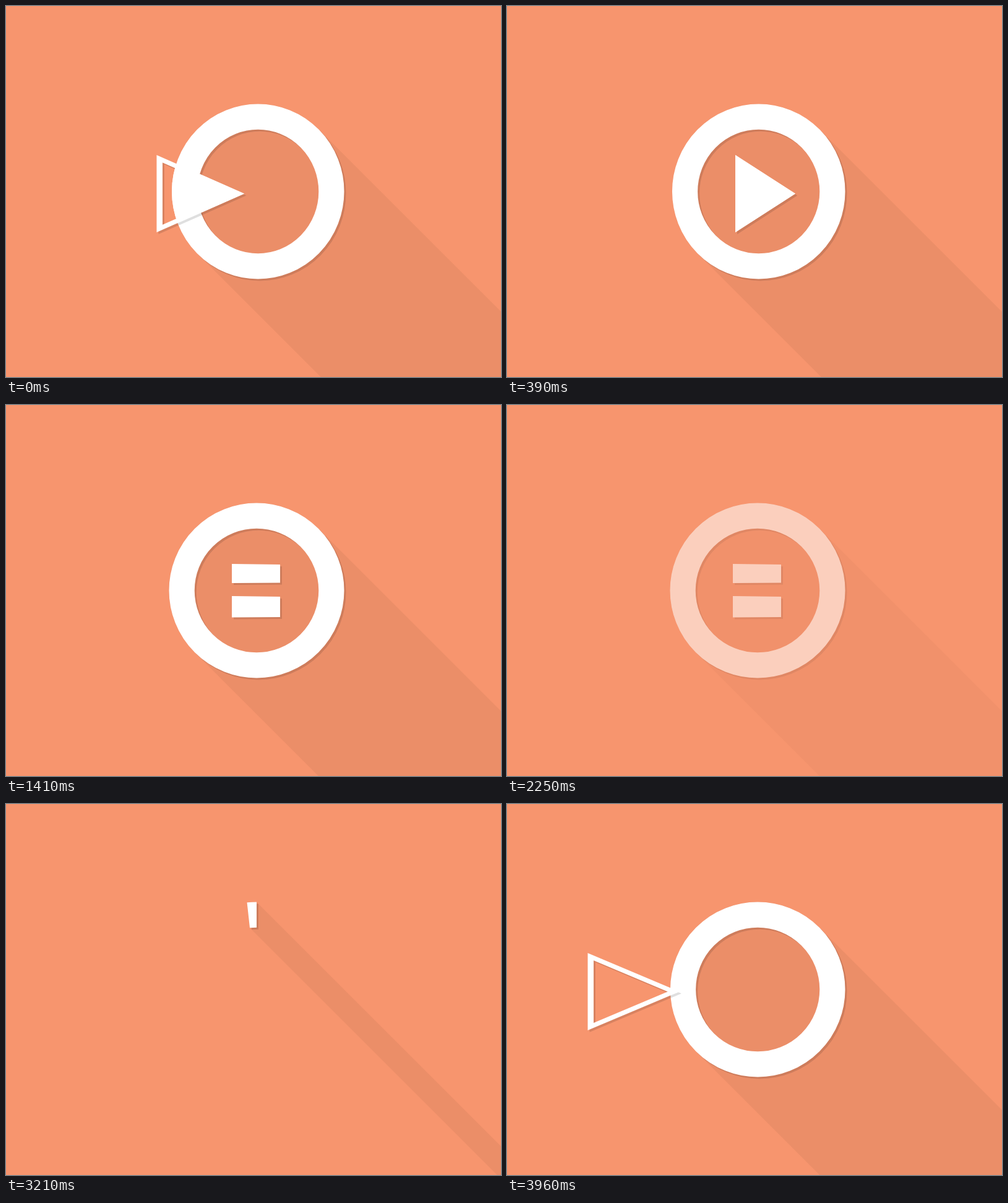
These frames come from a looping animation (800 by 600 pixels, 3.99 s). An HTML page with a canvas:

```html
<!DOCTYPE html>
<html lang="en">
<head>
<meta charset="utf-8">
<title>Play and pause</title>
<style>
html, body { margin: 0; width: 100%; height: 100%; overflow: hidden; background: #f7956e; }
canvas { display: block; width: 800px; height: 600px; }
</style>
</head>
<body>
<canvas id="stage" width="800" height="600"></canvas>
<script>
const LOOP = 3990, TICK = 30, START = 3000, LAST = 67;
const FADE_END = 3060;
const FADE = [[2010, .88], [2100, .77], [2160, .66], [2250, .55],
              [2310, .44], [2400, .33], [2490, .21], [2610, .1]];
const CX = 405, CY = 300, R = 120.9, WIDTH = 41.2;
const TOP = 241, MID = 303.5, BOTTOM = 366;

const stage = document.getElementById('stage');
const ctx = stage.getContext('2d');
const layer = document.createElement('canvas');
layer.width = 800;
layer.height = 600;
const pen = layer.getContext('2d');

const mix = (a, b, f) => a + (b - a) * f;

// Symmetric cubic-bezier(a, 0, 1 - a, 1) between two steps
function ease(u, from, to, a) {
  const x = (u - from) / (to - from);
  if (x <= 0) return 0;
  if (x >= 1) return 1;
  let lo = 0, hi = 1, p;
  for (let i = 0; i < 30; i++) {
    p = (lo + hi) / 2;
    const q = 1 - p;
    if (3 * p * q * q * a + 3 * p * p * q * (1 - a) + p * p * p < x) lo = p;
    else hi = p;
  }
  return p * p * (3 - 2 * p);
}

function poly(c, points) {
  points.forEach(([x, y], i) => i ? c.lineTo(x, y) : c.moveTo(x, y));
  c.closePath();
}

// Paint a flat white layer, then place it with its drop shadow
function raised(paint) {
  pen.clearRect(0, 0, 800, 600);
  pen.fillStyle = pen.strokeStyle = '#fff';
  pen.save();
  paint(pen);
  pen.restore();
  ctx.save();
  ctx.shadowColor = 'rgba(0,0,0,.125)';
  ctx.shadowOffsetX = ctx.shadowOffsetY = 3;
  ctx.shadowBlur = 1;
  ctx.drawImage(layer, 0, 0);
  ctx.restore();
}

function ringState(u) {
  const squash = u < 28 ? 4.5 * Math.max(0, u - 26.9) / 1.1
                        : 4.5 * (1 - ease(u, 28, 59, .5));
  return { cx: CX + squash / 2, rx: R - squash / 2, sweep: 2 * Math.PI * ease(u, 1.5, 26.5, .89) };
}

// Extrude the ring's outline along the diagonal
function longShadow({ cx, rx, sweep }) {
  const n = Math.max(2, Math.ceil(sweep / .03));
  const side = d => Array.from({ length: n + 1 }, (_, i) => {
    const a = -Math.PI / 2 - sweep * i / n;
    return [cx + (rx + d) * Math.cos(a), CY + (R + d) * Math.sin(a)];
  });
  const edge = [...side(WIDTH / 2), ...side(-WIDTH / 2).reverse()];
  ctx.beginPath();
  edge.forEach(([x, y], i) => {
    const [x2, y2] = edge[(i + 1) % edge.length];
    const quad = [[x, y], [x2, y2], [x2 + 800, y2 + 800], [x + 800, y + 800]];
    // One winding for all quads so that they merge
    if ((x2 - x) - (y2 - y) < 0) quad.reverse();
    poly(ctx, quad);
  });
  ctx.fillStyle = 'rgba(0,0,0,.046)';
  ctx.fill();
}

function ring(c, { cx, rx, sweep }) {
  c.lineWidth = WIDTH;
  c.beginPath();
  c.ellipse(cx, CY, rx, R, 0, -Math.PI / 2, -Math.PI / 2 - sweep, true);
  c.stroke();
}

// Outlined outside the ring, solid within it
function arrow(c, u, { cx, rx }) {
  const left = mix(-170, 369, ease(u, 17.47, 36.2, .85));
  const wide = mix(150, 97, ease(u, 26, 32.7, .5));
  const tip = left + wide, slope = (MID - TOP) / wide;
  const inset = 9.5 * slope + 8;
  const outer = [[left, TOP], [tip, MID], [left, BOTTOM]];
  c.beginPath();
  poly(c, outer);
  poly(c, [[left + 9.5, TOP + inset], [tip - 8 / slope, MID], [left + 9.5, BOTTOM - inset]]);
  c.fill('evenodd');
  c.beginPath();
  c.ellipse(cx, CY, rx + WIDTH / 2, R + WIDTH / 2, 0, 0, 2 * Math.PI);
  c.clip();
  c.beginPath();
  poly(c, outer);
  c.fill();
}

// The two halves of the triangle become bars
function bars(c, f) {
  const l = mix(369, 365, f), r = mix(466, 443, f), g = f * f;
  c.beginPath();
  poly(c, [[l, mix(TOP, 257, f)], [r, mix(MID, 258, f)],
           [r, mix(MID, 287.5, g)], [l, mix(MID, 288, g)]]);
  poly(c, [[l, mix(MID, 309, g)], [r, mix(MID, 310, g)],
           [r, mix(BOTTOM, 343, f)], [l, mix(BOTTOM, 343.5, f)]]);
  c.fill();
}

function draw(t) {
  let u = LAST, alpha = 1;
  if (t >= FADE[0][0] && t < FADE_END) {
    for (const [at, level] of FADE) if (t >= at) alpha = level;
  } else {
    // Every sixth tick repeats the previous step
    const k = Math.floor((t - START + LOOP) % LOOP / TICK);
    u = Math.min(LAST, k - Math.floor((k + 1) / 6));
  }
  stage.style.opacity = alpha;
  ctx.clearRect(0, 0, 800, 600);
  const state = ringState(u);
  if (state.sweep > 0) {
    longShadow(state);
    raised(c => ring(c, state));
  }
  const morph = ease(u, 41, LAST, .9);
  if (morph > 0) raised(c => bars(c, morph));
  else if (u > 17) raised(c => arrow(c, u, state));
}

function frame() {
  draw(performance.now() % LOOP);
  requestAnimationFrame(frame);
}
frame();
</script>
</body>
</html>
```
